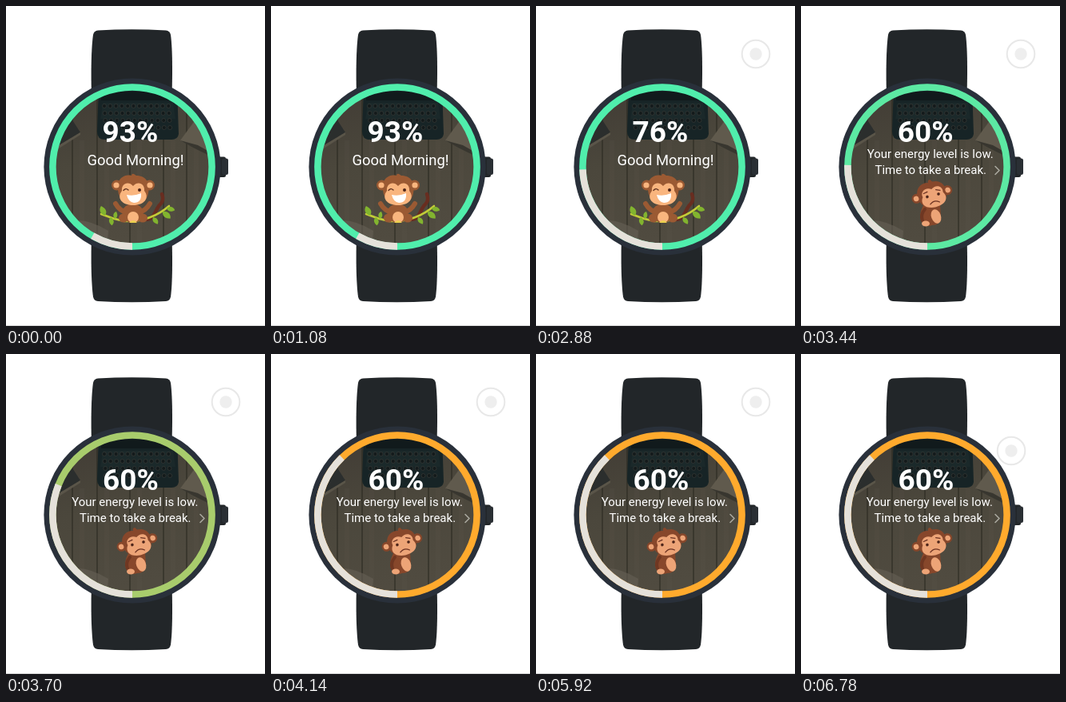
Write an HTML page that moves like this. It is 324 px wide and 400 px high and loops after 6.8 s.

```html
<!DOCTYPE html>
<html lang="en">
<head>
<meta charset="utf-8">
<title>Watch energy level</title>
<style>
html, body { margin: 0; width: 100%; height: 100%; overflow: hidden; background: #fff; }
svg { display: block; width: 324px; height: 400px; }
text { font-family: Roboto, sans-serif; fill: #fff; text-anchor: middle; }
.line { fill: none; stroke-linecap: round; stroke-linejoin: round; }
</style>
</head>
<body>
<svg viewBox="0 0 324 400">
  <defs>
    <clipPath id="screen"><circle cx="158" cy="201" r="97"/></clipPath>
    <linearGradient id="wood" x1="0" y1="0" x2=".25" y2="1">
      <stop offset="0" stop-color="#403b34"/><stop offset=".5" stop-color="#4b473c"/><stop offset="1" stop-color="#504b40"/>
    </linearGradient>
    <path id="strap" d="M107 110C106 78 107 50 109 36Q110 31 115 30.5Q157 28 200 30.5Q205 31 206 36C208 50 208.5 78 207.5 110Z"/>
    <path id="leaf" d="M0 0C-7-2-8-8-5-12C1-9 3-5 0 0Z"/>
  </defs>

  <rect y="399" width="324" height="1" fill="#d4d4d4"/>
  <g fill="#222629">
    <use href="#strap"/>
    <use href="#strap" transform="matrix(1 0 0 -1 0 399.5)"/>
    <rect x="262" y="188.5" width="13" height="25.5" rx="2.5"/>
    <rect x="270" y="190.5" width="8" height="20.5" rx="2.5" fill="#2a2f34"/>
  </g>
  <circle cx="158" cy="201" r="110.6" fill="#29303a"/>

  <g clip-path="url(#screen)">
    <rect x="58" y="100" width="200" height="202" fill="url(#wood)"/>
    <g id="planks"></g>
    <path d="M55 160L80 138L93 158L58 179Z" fill="#2b2e2d"/>
    <path d="M58 179L93 158V161L60 182Z" fill="#5a5549"/>
    <path d="M218 168L243 134L265 148V188Z" fill="#605a4d"/>
    <path d="M218 168L240 174L265 188V192L236 178Z" fill="#38362f"/>
    <path d="M75 271Q96 262 128 281L126 306H92Z" fill="#655f53" opacity=".65"/>
    <path d="M116 100H214L216 160Q215 167 207 167H124Q113 167 114 155Z" fill="#172426"/>
    <path d="M119 107H210V118H119Z" fill="#111a1c"/>
    <path d="M121 121H209L212 141H118Z" fill="#1b292a"/>
    <g id="keys" fill="#131a1b" stroke="#3d3f3b" stroke-width=".6"></g>
  </g>

  <g class="line" stroke-width="8.5" transform="rotate(90 158 201)">
    <circle id="level" cx="158" cy="201" r="99.6"/>
    <circle id="gap" cx="158" cy="201" r="99.6" pathLength="360" stroke="#e5e1da" stroke-linecap="butt"/>
  </g>

  <text id="percent" y="170" font-size="37" font-weight="700"></text>

  <g id="happy">
    <text x="162" y="199" font-size="18.4">Good Morning!</text>
    <path class="line" d="M172 267C188 268 186 253 193 248Q198 243 195 235" stroke="#682d20" stroke-width="4.5"/>
    <path class="line" d="M119 260Q133 266 148 269Q181 270 204 250" stroke="#c3cd38" stroke-width="2.6"/>
    <g fill="#82b42f">
      <use href="#leaf" transform="translate(124 262)"/>
      <use href="#leaf" transform="translate(131 264) rotate(195) scale(.8)"/>
      <use href="#leaf" transform="translate(136 266) rotate(35) scale(.7)"/>
      <use href="#leaf" transform="translate(184 264) rotate(170) scale(.8)"/>
      <use href="#leaf" transform="translate(196 257) rotate(155)"/>
      <use href="#leaf" transform="translate(201 253) rotate(125) scale(.8)"/>
    </g>
    <g fill="#9b5a33">
      <path class="line" d="M151 258Q142 256 137 247M166 258Q175 256 180 247" stroke="#9b5a33" stroke-width="6"/>
      <ellipse cx="158.5" cy="259" rx="13" ry="12"/>
      <ellipse cx="147" cy="265" rx="6" ry="5.5"/><ellipse cx="171" cy="265" rx="6" ry="5.5"/>
      <circle cx="138.5" cy="224" r="6.5"/><circle cx="179.5" cy="224" r="6.5"/>
      <path d="M140 230C138 215 149 210 157 212Q157 209 160 210L163 212C175 212 181 221 178 234C175 254 142 254 140 230Z"/>
    </g>
    <g fill="#f9b57e">
      <circle cx="138" cy="224" r="3.6"/><circle cx="180" cy="224" r="3.6"/>
      <path d="M159 225C153 218 144 222 145 231C138 240 145 249 159 249S180 240 173 231C174 222 165 218 159 225Z"/>
      <ellipse cx="159" cy="264" rx="7" ry="7"/>
    </g>
    <path d="M154 271Q159 265 164 271Z" fill="#ecd04e"/>
    <path class="line" d="M147 230.5Q150 227 153 230" stroke="#5a2d1d" stroke-width="1.3"/>
    <circle cx="167" cy="230" r="2" fill="#4d251a"/>
    <path d="M151 236Q160 238 169 234Q170 246 160 246Q153 245 151 236Z" fill="#fff"/>
  </g>

  <g id="tired">
    <g id="advice" font-size="15">
      <text x="161" y="190">Your energy level is low.</text>
      <text x="161.5" y="210">Time to take a break.</text>
    </g>
    <path class="line" d="M243 200.5L248 205.5L243 210.5" stroke="#aaa99f" stroke-width="1.6"/>
    <path d="M153 249Q146 263 151 270Q157 277 164 274Q174 274 175 264L174 247Z" fill="#87472b"/>
    <path class="line" d="M155 254Q149 261 152 268" stroke="#6f3722" stroke-width="4"/>
    <ellipse cx="169" cy="263" rx="6" ry="9" transform="rotate(-20 169 263)" fill="#eda477"/>
    <ellipse cx="156" cy="272" rx="5" ry="3.5" fill="#eda477"/>
    <g transform="rotate(-14 164 236)">
      <g fill="#87472b">
        <circle cx="144" cy="236" r="6"/><circle cx="184" cy="235" r="6"/>
        <path d="M146 238C144 224 153 218 163 220Q162 217 166 217L168 220C179 220 184 229 182 239C178 256 149 256 146 238Z"/>
      </g>
      <g fill="#eda477">
        <circle cx="143.5" cy="236" r="3.3"/><circle cx="184.5" cy="235" r="3.3"/>
        <path d="M165 229C158 224 150 229 152 236C146 244 153 252 165 252S184 245 178 236C180 228 171 224 165 229Z"/>
      </g>
      <circle cx="157.5" cy="237" r="1.8" fill="#4d251a"/><circle cx="172" cy="237" r="1.8" fill="#4d251a"/>
      <path class="line" d="M154 232L159 231M170 231L175 233M159 247Q165 242 171 247" stroke="#6a3021" stroke-width="1.2"/>
    </g>
  </g>

  <g id="touch">
    <circle r="17.3" fill="#fff" fill-opacity=".5" stroke="#e8e8e8" stroke-width="2"/>
    <circle r="7.7" fill="#eee"/>
  </g>
</svg>
<script>
const LOOP = 6800;
const $ = id => document.getElementById(id);
const clamp = x => Math.min(1, Math.max(0, x));
const span = (t, a, b) => clamp((t - a) / (b - a));
const smooth = x => x * x * (3 - 2 * x);
const out = x => 1 - (1 - x) ** 2;
const mix = (a, b, k) => a + (b - a) * k;
const green = [80, 238, 172], orange = [255, 170, 45];

$('planks').innerHTML = [83, 114, 155, 197, 226].map(x =>
  `<path d="M${x} 100V304" stroke="#292820" stroke-width="1.4" opacity=".75"/>` +
  `<path d="M${x + 12} 168V304" stroke="#706859" stroke-width="6" opacity=".1"/>`).join('');

let keys = '';
for (let row = 0; row < 4; row++)
  for (let i = 0; i < 12; i++)
    keys += `<circle cx="${123 + row * .6 + i * 7.3}" cy="${125 + row * 9}" r="2.5"/>`;
$('keys').innerHTML = keys;

function draw(t) {
  const first = smooth(span(t, 1480, 2240)), second = smooth(span(t, 3320, 4080));
  const low = t >= 3320;
  $('percent').textContent = low ? '60%' : t >= 1480 ? '76%' : '93%';
  $('percent').setAttribute('x', 155.5 + second);
  $('advice').setAttribute('transform', `translate(${.8 - second})`);
  $('happy').style.display = low ? 'none' : '';
  $('tired').style.display = low ? '' : 'none';
  $('level').setAttribute('stroke', `rgb(${green.map((c, i) => mix(c, orange[i], second))})`);
  $('gap').setAttribute('stroke-dasharray', `${30 + 58 * first + 48 * second} 360`);

  const enter = out(span(t, 1650, 2200)), leave = smooth(span(t, 6200, 6760));
  const x = mix(mix(281, 275, enter), 263, leave);
  const y = mix(mix(-18, 60, enter), 121, leave);
  $('touch').setAttribute('transform', `translate(${x} ${y})`);
  $('touch').setAttribute('opacity', enter);
}

const start = performance.now();
function tick() {
  draw((performance.now() - start) % LOOP);
  requestAnimationFrame(tick);
}
tick();
</script>
</body>
</html>
```
